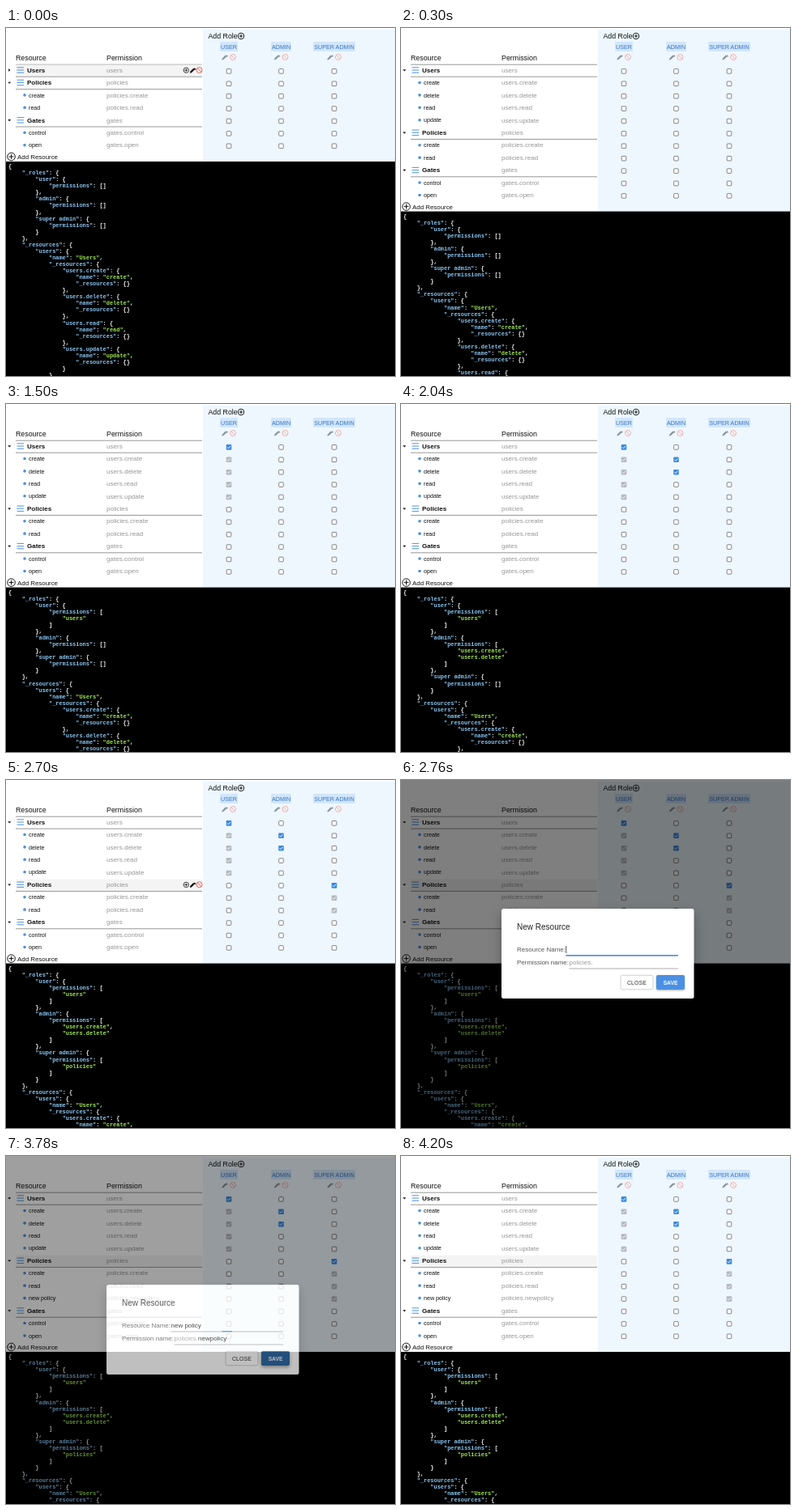
An HTML page for the animation above (4320 ms loop, 480 by 430 pixels).

```html
<!DOCTYPE html>
<html lang="en">
<head>
<meta charset="utf-8">
<title>Roles and resources</title>
<style>
  html, body { margin: 0; width: 100%; height: 100%; overflow: hidden; background: #fff; }
  svg { display: block; width: 480px; height: 430px; }
  text { font-family: "Liberation Sans", Arial, sans-serif; white-space: pre; }
  .code text { font: bold 6.95px "Liberation Mono", "Courier New", monospace; fill: #f4f4f4; }
  .key { fill: #8ac6f2; }
  .str { fill: #9fe84f; }
</style>
</head>
<body>
<svg id="stage" viewBox="0 0 480 430"></svg>
<script>
const LOOP = 4320, STEP = 60;
const ROW = 15.45, FIRST = 52;
const BLUE = '#4a90e2';
const ROLES = [['user', 275, 22], ['admin', 339.5, 25], ['super admin', 405, 52]];
const TREE = {
  Users: ['create', 'delete', 'read', 'update'],
  Policies: ['create', 'read'],
  Gates: ['control', 'open']
};

// [time, role, permission]
const CHECKS = [
  [480, 'user', 'users.create'],
  [660, 'user', 'users.delete'],
  [1260, 'user', 'users'],
  [1740, 'admin', 'users.create'],
  [1980, 'admin', 'users.delete'],
  [2220, 'super admin', 'policies']
];
const T = { expand: 60, leave: 300, hover: 2640, open: 2760, type: 2960, save: 3540, blur: 3670, close: 3740 };

const stage = document.getElementById('stage');
const clamp = v => Math.max(0, Math.min(1, v));
const compact = s => s.replace(/ /g, '');

const text = (x, y, s, size, fill = '#111', extra = '') =>
  `<text x="${x}" y="${y}" font-size="${size}" fill="${fill}" ${extra}>${s}</text>`;
const rect = (x, y, w, h, fill, extra = '') =>
  `<rect x="${x}" y="${y}" width="${w}" height="${h}" fill="${fill}" ${extra}/>`;
const path = (d, stroke, width = 1, fill = 'none') =>
  `<path d="${d}" fill="${fill}" stroke="${stroke}" stroke-width="${width}"/>`;
const circle = (x, y, r, fill, stroke = 'none', width = 1) =>
  `<circle cx="${x}" cy="${y}" r="${r}" fill="${fill}" stroke="${stroke}" stroke-width="${width}"/>`;

const plus = (x, y, r, w = 1) => circle(x, y, r, 'none', '#111', w) +
  path(`M${x - r * .6} ${y}h${r * 1.2}M${x} ${y - r * .6}v${r * 1.2}`, '#111', w);
const ban = (x, y, color) => circle(x, y, 3.5, 'none', color, .9) +
  path(`M${x - 2.4} ${y - 2.4}l4.8 4.8`, color, .9);
const pencil = (x, y, color) =>
  path(`M${x - 3.4} ${y + 3.4}l.5-2.1 3.9-3.9 1.6 1.6-3.9 3.9z` +
       `M${x + 1.6} ${y - 2}l1-1 1.6 1.6-1 1z`, 'none', 0, color);

function checkbox(x, y, on, locked) {
  if (!on) return rect(x - 2.8, y - 2.8, 5.6, 5.6, '#fff', 'rx=".8" stroke="#777" stroke-width=".9"');
  return rect(x - 3.3, y - 3.3, 6.6, 6.6, locked ? '#b4b9be' : '#3b8ae2', 'rx="1"') +
    path(`M${x - 2} ${y}l1.4 1.5 2.7-3`, '#fff', .9);
}

function modelAt(t) {
  const children = { ...TREE };
  if (t >= T.close) children.Policies = [...TREE.Policies, 'new policy'];
  const granted = {};
  for (const [role] of ROLES) granted[role] = [];
  for (const [time, role, perm] of CHECKS) {
    if (t < time) continue;
    granted[role] = granted[role].filter(p => !p.startsWith(perm + '.')).concat(perm);
  }
  return { children, granted };
}

function rowsOf(children, expanded) {
  const rows = [];
  for (const group in children) {
    const perm = group.toLowerCase();
    const open = group !== 'Users' || expanded;
    rows.push({ name: group, perm, group: true, open });
    if (open) for (const name of children[group])
      rows.push({ name, perm: `${perm}.${compact(name)}`, parent: perm });
  }
  return rows;
}

function drawHeader(bottom) {
  let out = rect(243, 2, 237, bottom - 2, '#eef7fe');
  out += text(249.5, 13, 'Add Role', 8.8) + plus(290, 10, 3.8, .9);
  out += text(12, 40, 'Resource', 8.8) + text(124, 40, 'Permission', 8.9);
  out += path('M12 45.2H242', '#8c8c8c', .9);
  for (const [role, x, w] of ROLES) {
    out += rect(x - w / 2, 17, w, 12, '#d0e6fb', 'rx="1"');
    out += text(x, 25.9, role.toUpperCase(), 7.2, '#3c74c4', 'text-anchor="middle"');
    out += pencil(x - 5.2, 36.2, '#8d9499') + ban(x + 5, 36, '#f2a9a4');
  }
  return out;
}

function drawRow(row, i, granted, hover, icons) {
  const y = FIRST + i * ROW;
  let out = '';
  if (row.group) {
    if (hover) out += rect(12, y - 6.5, 230, 14, '#f4f4f4');
    out += path(row.open ? `M2.2 ${y - .8}h4l-2 2.2z` : `M3.2 ${y - 2}v4l2.2-2z`, 'none', 0, '#111');
    for (const d of [-3.2, 0, 3.2]) out += path(`M13.5 ${y + d}h8.6`, '#5b9bdd', 1.1);
    out += text(26, y + 2.8, row.name, 8, '#111', 'font-weight="bold"');
    out += path(`M12 ${y + 8.2}H242`, '#8c8c8c', .9);
    if (icons) out += plus(222.3, y + .2, 3.2, .8) + pencil(230.3, y + .3, '#111') + ban(238.6, y, '#e8554d');
  } else {
    out += circle(23, y, 1.8, BLUE) + text(28, y + 2.6, row.name, 7.15);
  }
  out += text(124, y + 2.7, row.perm, 8.05, '#969696');
  for (const [role, x] of ROLES) {
    const locked = granted[role].includes(row.parent);
    out += checkbox(x, 53.4 + i * 15.4, locked || granted[role].includes(row.perm), locked);
  }
  return out;
}

function drawCode({ children, granted }, top) {
  const data = { _roles: {}, _resources: {} };
  for (const role in granted) data._roles[role] = { permissions: granted[role] };
  for (const group in children) {
    const id = group.toLowerCase(), nested = {};
    for (const name of children[group]) nested[`${id}.${compact(name)}`] = { name, _resources: {} };
    data._resources[id] = { name: group, _resources: nested };
  }
  const paint = line => line.replace(/"[^"]*"(:?)/g, (s, colon) =>
    `<tspan class="${colon ? 'key' : 'str'}">${colon ? s.slice(0, -1) : s}</tspan>${colon}`);
  const lines = JSON.stringify(data, null, 4).split('\n').slice(0, 35);
  return rect(0, top, 480, 430 - top, '#000') + '<g class="code">' +
    lines.map((s, i) => `<text x="3" y="${top + 8.1 + i * 8.06}">${paint(s)}</text>`).join('') + '</g>';
}

function drawDialog(t) {
  const alpha = t < T.close ? 1 : 1 - clamp((t - T.close) / 160);
  if (t < T.open || !alpha) return '';
  const count = Math.max(0, Math.floor((t - T.type) / 40));
  const name = 'new policy'.slice(0, count);
  const focus = (1 - clamp((t - T.blur) / 200)) ** 3;
  const over = clamp((t - T.save) / 180);
  const mix = (a, b) => Math.round(a + (b - a) * over);
  const saveFill = `rgb(${mix(74, 47)},${mix(144, 106)},${mix(226, 165)})`;
  const caret = 203.8 + 8 * [.556, .556, .722, .278, .556, .556, .222, .222, .5, .5]
    .slice(0, count).reduce((a, b) => a + b, 0);

  let out = rect(0, 0, 480, 430, '#000', 'opacity=".5"');
  out += rect(124, 159, 237.5, 111, '#fff',
    'rx="2.5" style="filter:drop-shadow(0 6px 7px rgba(0,0,0,.3))"');
  out += text(143, 185, 'New Resource', 10, '#222');
  out += text(143, 211.8, 'Resource Name:', 8, '#555') + text(203.5, 212.4, name, 8);
  out += path('M203.5 217H342', '#999', .8);
  if (focus) out += path(`M${272.7 - 69.3 * focus} 216.7h${138.6 * focus}`, BLUE, 1.4);
  if (t < T.blur) out += path(`M${caret} 205v9`, '#222', .8);
  out += text(143, 227.8, 'Permission name:', 8, '#555') + text(207.5, 228.4, 'policies.', 8, '#999');
  out += text(237, 228, compact(name), 8) + path('M207.5 233H342', '#999', .8);
  out += rect(271, 241.3, 40, 17.5, '#fff', 'rx="2" stroke="#c4c4c4" stroke-width=".8"');
  out += text(291, 252.5, 'CLOSE', 6.9, '#333', 'text-anchor="middle" letter-spacing=".15"');
  out += rect(315, 241, 35, 18, saveFill,
    `rx="2" style="filter:drop-shadow(0 ${1 + over}px ${1 + over}px rgba(0,0,0,.35))"`);
  out += text(332.5, 252.5, 'SAVE', 6.7, '#fff', 'text-anchor="middle" font-weight="bold"');
  return `<g opacity="${alpha}">${out}</g>`;
}

function draw(t) {
  const model = modelAt(t);
  const rows = rowsOf(model.children, t >= T.expand);
  const top = 165 + (rows.length - 7) * 15.4;
  const hovered = t < T.leave ? 'Users' : t >= T.hover ? 'Policies' : '';
  const icons = t < T.leave || (t >= T.hover && t < T.open);
  stage.innerHTML = drawHeader(top) +
    rows.map((r, i) => drawRow(r, i, model.granted, r.name === hovered, icons && r.name === hovered)).join('') +
    plus(6.5, top - 6, 4.8, 1) + text(14, top - 2.9, 'Add Resource', 7.9) +
    drawCode(model, top) + drawDialog(t);
}

let shown = -1;
function tick() {
  const t = Math.floor(performance.now() % LOOP / STEP) * STEP;
  if (t !== shown) draw(shown = t);
  requestAnimationFrame(tick);
}
tick();
</script>
</body>
</html>
```
